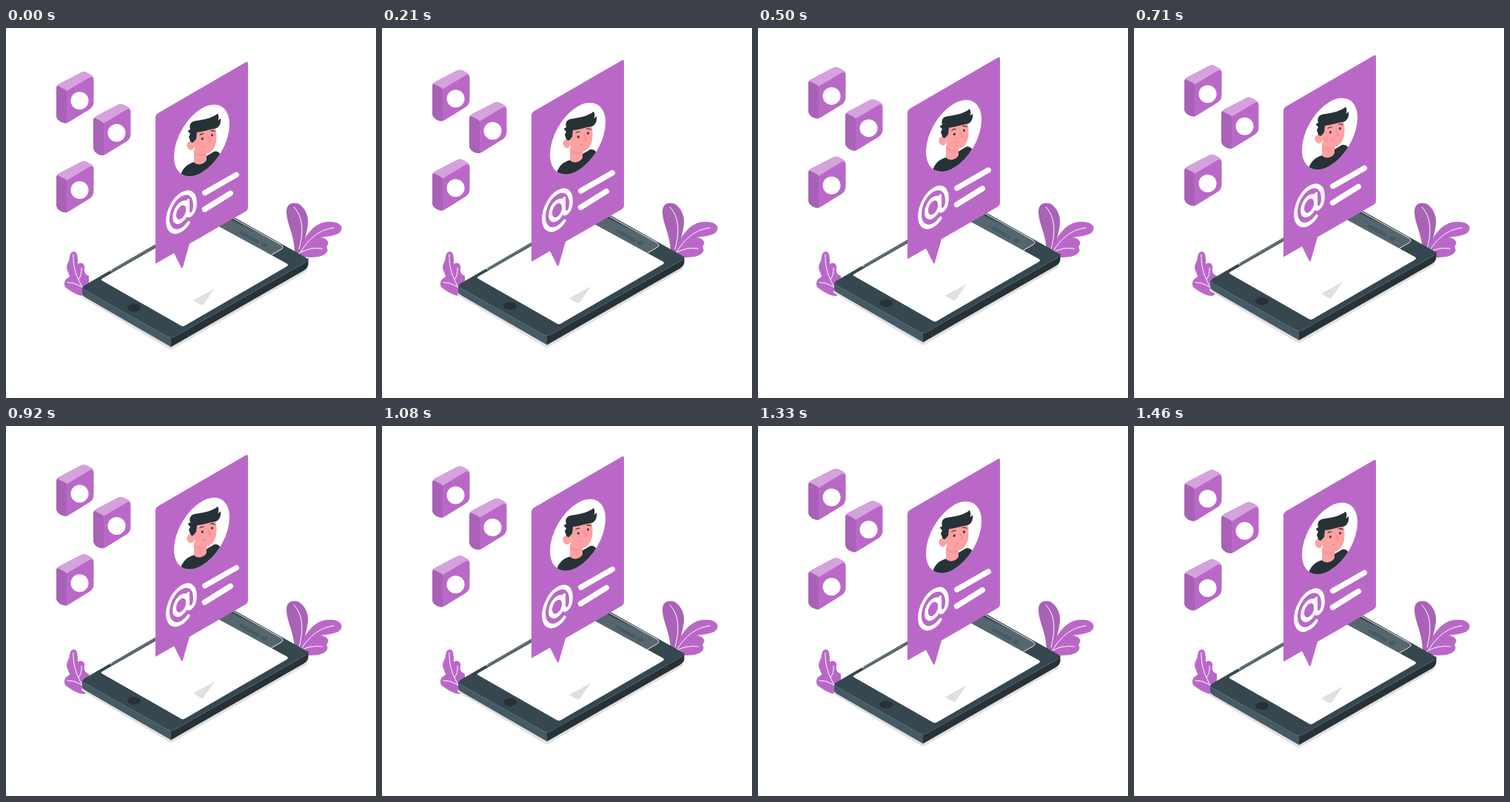
Recreate the animation shown at these times as an HTML page with a canvas. Size 500 px wide and 500 px high, loop 1.5 s.

```html
<!DOCTYPE html>
<html lang="en">
<head>
<meta charset="utf-8">
<title>Floating profile card</title>
<style>
  html, body { margin: 0; width: 100%; height: 100%; overflow: hidden; background: #fff; }
  canvas { display: block; width: 500px; height: 500px; }
</style>
</head>
<body>
<canvas id="stage"></canvas>
<script>
const canvas = document.getElementById('stage');
const ctx = canvas.getContext('2d');
const ratio = window.devicePixelRatio || 1;
canvas.width = canvas.height = 500 * ratio;

const LOOP = 1500, RISE = 730, LIFT = 9.2;
const PURPLE = '#ba68c8', PURPLE_DARK = '#a962b6', PURPLE_LIGHT = '#d5a2dd';
const INK = '#263238', SLATE = '#37474f', STEEL = '#455a64', GREY = '#e0e0e0';
const SKIN = '#fda1a2', NECK = '#f5949b', BLUSH = '#e8727d';

function fill(path, color) {
  ctx.fillStyle = color;
  ctx.fill(new Path2D(path));
}

function stroke(path, color, width = 1) {
  ctx.strokeStyle = color;
  ctx.lineWidth = width;
  ctx.lineCap = ctx.lineJoin = 'round';
  ctx.stroke(new Path2D(path));
}

function oval(x, y, rx, ry, color, turn = 0) {
  ctx.fillStyle = color;
  ctx.beginPath();
  ctx.ellipse(x, y, rx, ry, turn, 0, Math.PI * 2);
  ctx.fill();
}

function at(x, y, draw) {
  ctx.save();
  ctx.translate(x, y);
  draw();
  ctx.restore();
}

// Local axes of the upright card face.
function onFace(x, y, draw) {
  at(x, y, () => {
    ctx.transform(0.866, -0.5, 0, 1, 0, 0);
    draw();
  });
}

function drawLeaves() {
  fill('M92 302C97 302 97 312 97 319C101 316 107 318 106 324C105 330 107 333 112 335L112 358L106 362C98 363 88 356 81 351C77 347 79 339 85 337C88 335 82 329 82 323C82 318 86 315 86 309Q87 302 92 302Z', PURPLE);
  stroke('M91 306C90 324 96 338 104 352M83 344Q94 344 102 350M102 324Q103 333 98 340', '#fff');

  fill('M390 308C391 280 379 265 379 248C379 238 386 235 394 237C403 241 409 252 408 264C407 276 403 285 401 300Z', PURPLE_DARK);
  fill('M397 304C400 286 412 268 428 263C440 260 454 263 453.5 271C453 279 443 281 425 283C434 284 438 290 434 294C432 297 436 298 434 302C430 310 416 311 396 309Z', PURPLE);
  stroke('M389 242C402 255 402 277 396 299', '#fff');
  stroke('M443 270C425 272 410 283 398 303M427 298Q411 296 399 303', '#fff');
}

function drawPhone() {
  fill('M102 361V364L220 433.5Q223 435.5 226 433.5L406 329.5L408 320L224 420Z', GREY);
  fill('M103 350V358Q103 361.5 108 364.5L223 431V416Z', STEEL);
  fill('M223 416V431L402 328Q408.5 324 408.5 319V311Z', INK);
  fill('M107 347.3L282 246Q286 243.5 290 245.5L404 309.5Q411 313.5 405 316.5L227 417Q223 419 219 417L107 354Q101 350.5 107 347.3Z', SLATE);
  stroke('M105 353.5L219 417.5Q223 419.5 227 417.5L405 316.5', '#60727b', 0.8);

  // Top panel and side rim around the display.
  fill('M141 329L281 248L370 291.5Q377 296 372 299L359 307L268 264L144 334Z', '#56666e');
  stroke('M141 328.5L286 245.5L370 292Q377 296 372 299L359 306.5', '#eef1f2');
  stroke('M144 327L202 293.5', '#5d6b72', 1.5);
  fill('M131 338L270 258.5L379 318Q383 320 379 322.5L242 402Q239 404 236 402L130 341.5Q127 340 131 338Z', '#fff');
  stroke('M318 277L340 289', STEEL, 4.5);
  oval(349, 293.5, 4.2, 2.7, STEEL);
  oval(173, 378, 9, 5.2, INK);
  fill('M282 352L253 368L263 374Q265 375 267 373.5Z', GREY);
}

function drawPortrait() {
  ctx.save();
  onFace(264.5, 152, () => {
    ctx.beginPath();
    ctx.arc(0, 0, 43.3, 0, Math.PI * 2);
  });
  ctx.fillStyle = '#fff';
  ctx.fill();
  ctx.clip();

  fill('M234 205C238 189 244 184 255 181L271 173L281 167Q287 165 291 173L300 202Z', INK);
  fill('M254 164V181C258 187 269 184 271 178V167Z', SKIN);
  fill('M255 168Q263 173 271 169L271 171Q262 176 255 170Z', NECK);
  oval(249.5, 159, 5, 6, SKIN, -0.2);
  fill('M252 143L281 130Q285 137 284.5 149C284 160 279 168 271 170C262 171 255 168 254 158Z', SKIN);
  fill('M249.5 154L247 147L249 143L245.5 139L249 137C247 131 250 126 256 125.5C265 124 279 122 286 115.5C288 119 287.5 122 286.5 125L290 122C291 129 288 135 282 136C275 137 267 140 258 141L257 150Q254 153 253 155Z', INK);
  oval(265.3, 149.8, 1.4, 1.8, INK);
  oval(278.5, 144.8, 1.4, 1.8, INK);
  stroke('M262 144.5Q264 142.5 267 143M276.5 139Q280 138 282 140', INK, 1.1);
  stroke('M273 147L276.5 153L273.5 154M267.5 160.5Q269 159.5 270.5 161', BLUSH, 0.8);
  ctx.restore();
}

function drawCard() {
  fill('M202 121Q202 117 205.5 115L324 46.3Q327 44.5 327 48V242Q327 246 324 247.7L248 291.5L239 323Q238 326 236.5 323L227 304.2L202 318.5Z', PURPLE);
  drawPortrait();
  onFace(237, 248.8, () => {
    stroke('M10 -10V5C10 14 21.3 13 21.3 0C21.3 -14 12 -24 0 -24C-12 -24 -21.3 -13 -21.3 0C-21.3 13 -12 24 0 24Q6 24 10.5 20.5', '#fff', 5.6);
    ctx.beginPath();
    ctx.ellipse(-0.5, 0, 10.5, 11.6, 0, 0, Math.PI * 2);
    ctx.stroke();
  });
  stroke('M268.8 222.7L311.3 198.4M268.5 245L303.3 223.3', '#fff', 7.4);
}

function drawTile(x, y) {
  at(x, y, () => {
    ctx.save();
    ctx.clip(new Path2D('M0 23Q0 18.5 4 16.3L33 1.2Q37 -1 41.5 1.2L47 4.2Q50.5 6.5 50.5 11V40Q50.5 47 45 50.5L17 67.8Q12 71 6 67.5Q0 64 0 59Z'));
    ctx.fillStyle = PURPLE;
    ctx.fillRect(0, -2, 52, 74);
    fill('M0 18.5L14 26L44 8Q48 5.5 51 9V-2H0Z', PURPLE_LIGHT);
    fill('M0 18L12 24Q14 25.5 14 28V72H0Z', PURPLE_DARK);
    ctx.restore();
    oval(31.5, 39, 12, 12, '#fff');
  });
}

function render(now) {
  const t = now % LOOP;
  const lift = LIFT * Math.max(0, 1 - Math.abs(t - RISE) / RISE);
  ctx.setTransform(ratio, 0, 0, ratio, 0, 0);
  ctx.fillStyle = '#fff';
  ctx.fillRect(0, 0, 500, 500);
  drawLeaves();
  at(0, -lift, () => {
    drawPhone();
    drawCard();
    drawTile(68, 59.2);
    drawTile(118, 102.7);
    drawTile(68, 180);
  });
}

const start = performance.now();
function tick() {
  render(performance.now() - start);
  requestAnimationFrame(tick);
}
tick();
</script>
</body>
</html>
```
